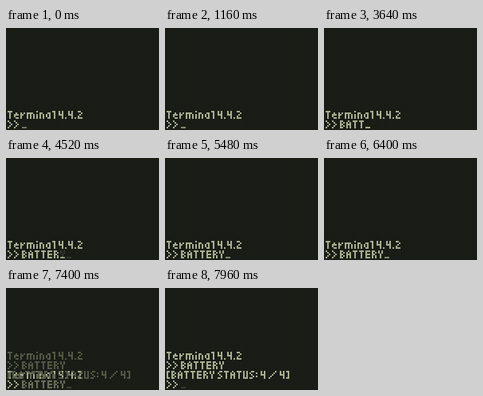
Animation of 192x128 px, one loop 8 s. Source, as an HTML page with a canvas:

```html
<!DOCTYPE html>
<html lang="en">
<head>
<meta charset="utf-8">
<title>Terminal</title>
<style>
  html, body { margin: 0; width: 100%; height: 100%; overflow: hidden; background: #1c1f18; }
  canvas { display: block; }
</style>
</head>
<body>
<canvas width="192" height="128" role="img" aria-label="Terminal 4.4.2 &gt;&gt; BATTERY [BATTERY STATUS: 4 / 4]"></canvas>
<script>
const ctx = document.querySelector('canvas').getContext('2d');
const DOT = 2, COLS = 96, ROWS = 64, LINE = 6, BOTTOM = 58;
const STEP = 40, LOOP = 8000;
const RISE = 0.2, DECAY = 0.75;

// Stroke font: each point is an x digit and a y digit, dashes join points.
const FONT = {
  T: '00-20 10-14', E: '20-00-04-24 02-22', B: '00-04-14 00-10 02-12 21 23',
  A: '04-01 10 21-24 02-22', R: '00-04 00-10 21 02-12 23-24',
  Y: '00-01 20-21 12-14', S: '20-10 01 12 23 14-04', U: '00-04-24-20',
  e: '11 02-22 03 14-24', r: '01-04 21 12', m: '04-01-31 22-24 42-44',
  i: '00 02-04', n: '04-01-11 22-24', a: '11-21-24-14 02-03', l: '00-10-14',
  4: '00-02-22 20-24', 2: '00-10 21 12 03 04-24', '.': '04', ':': '01 03',
  '>': '00-22-04', '[': '10-00-04-14', ']': '00-10-14-04', '/': '04-40',
  _: '04-24', ' ': ''
};

const TITLE = 'Terminal 4.4.2', PROMPT = '>> ', WORD = 'BATTERY';
const KEY_TIMES = [2400, 2600, 2880, 3440, 3920, 4240, 4520];
const ENTER = 7360;
const CARET_ON = [
  [0, 240], [840, 1160], [1760, 2040], [2400, 2920], [3440, 3800],
  [3920, 4560], [5160, 5480], [6080, 6400], [7000, 7240], [7960, LOOP]
];

function plotLine(lit, [x0, y0], [x1, y1]) {
  const n = Math.max(Math.abs(x1 - x0), Math.abs(y1 - y0)) || 1;
  for (let i = 0; i <= n; i++) {
    const x = Math.round(x0 + (x1 - x0) * i / n);
    const y = Math.round(y0 + (y1 - y0) * i / n);
    lit.add(y * COLS + x);
  }
}

function plotText(lit, text, y) {
  let x = 1;
  for (const char of text) {
    let right = -1;
    for (const stroke of FONT[char].split(' ').filter(Boolean)) {
      const points = stroke.split('-').map(p => [x + +p[0], y + +p[1]]);
      points.forEach((p, i) => {
        right = Math.max(right, p[0] - x);
        plotLine(lit, points[Math.max(0, i - 1)], p);
      });
    }
    x += right + 2;
  }
}

function litDots(time) {
  const typed = WORD.slice(0, KEY_TIMES.filter(t => t <= time).length);
  const caret = CARET_ON.some(([on, off]) => time >= on && time < off) ? '_' : '';
  const lines = time < ENTER
    ? [TITLE, PROMPT + typed + caret]
    : [TITLE, PROMPT + WORD, '[' + WORD + ' STATUS: 4 / 4]', PROMPT + caret];
  const lit = new Set();
  lines.reverse().forEach((line, i) => plotText(lit, line, BOTTOM - i * LINE));
  return lit;
}

// Slow display: dots light up evenly and fade out exponentially.
function buildFrames() {
  const level = new Float32Array(COLS * ROWS);
  for (const dot of litDots(0)) level[dot] = 2 * RISE;
  for (const dot of litDots(LOOP / 32 + STEP)) level[dot] = 1;
  const frames = [];
  for (let time = 0; time < LOOP; time += STEP) {
    const lit = litDots(time);
    for (let i = 0; i < level.length; i++) {
      if (lit.has(i)) level[i] = Math.min(1, level[i] + RISE);
      else level[i] = level[i] < 0.03 ? 0 : level[i] * DECAY;
    }
    frames.push(level.slice());
  }
  return frames;
}

const frames = buildFrames();

function draw(now) {
  const level = frames[Math.floor(now % LOOP / STEP)];
  ctx.globalAlpha = 1;
  ctx.fillStyle = '#1c1f18';
  ctx.fillRect(0, 0, 192, 128);
  ctx.fillStyle = '#b4bb9a';
  level.forEach((value, i) => {
    if (!value) return;
    ctx.globalAlpha = value;
    ctx.fillRect(i % COLS * DOT, Math.floor(i / COLS) * DOT, DOT, DOT);
  });
  // Faint screen grid
  ctx.globalAlpha = 0.08;
  ctx.fillStyle = '#000';
  for (let x = 1; x < 192; x += DOT) ctx.fillRect(x, 0, 1, 128);
  for (let y = 1; y < 128; y += DOT) ctx.fillRect(0, y, 192, 1);
}

const start = performance.now();
function tick() {
  draw(performance.now() - start);
  requestAnimationFrame(tick);
}
tick();
</script>
</body>
</html>
```
